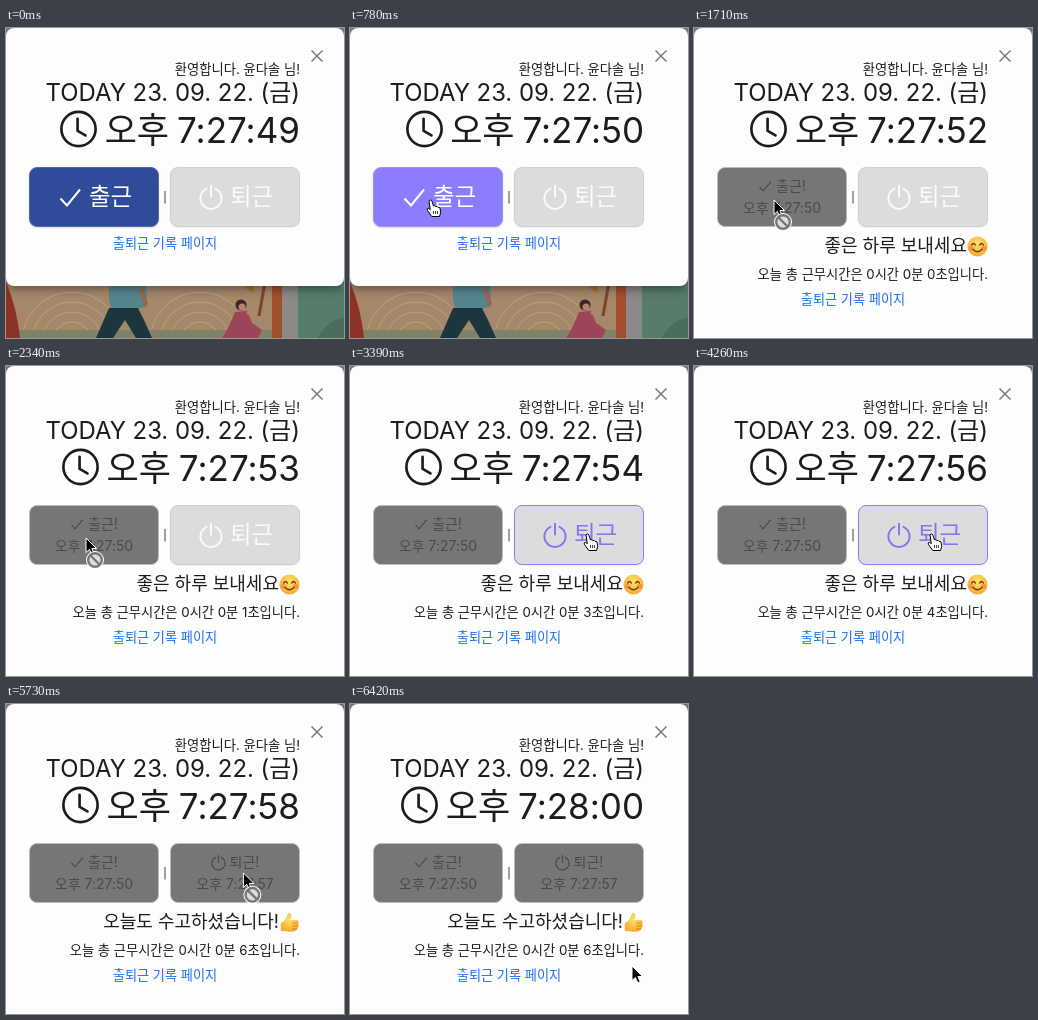
These frames come from a looping animation (338 px wide and 310 px high, 6450 ms). An HTML page:

```html
<!DOCTYPE html>
<html lang="ko">
<head>
<meta charset="utf-8">
<title>출퇴근</title>
<style>
html, body { margin: 0; width: 100%; height: 100%; overflow: hidden; }
body { font-family: Inter, "Noto Sans CJK KR", "Noto Sans CJK", sans-serif; color: #1c1c1e; }
#stage { position: relative; width: 338px; height: 310px; overflow: hidden; background: #808080; }
#stage svg { display: block; overflow: visible; }
#page, #modal, .abs { position: absolute; }
#page { left: 0; top: 254px; }
#modal { left: 0; top: 0; width: 338px; height: 258px; border-radius: 8px; background: #fdfdfd; box-shadow: 0 3px 10px #0006; }
.in #modal { height: 330px; }

/* zero line height: "top" is the middle of the capitals */
.t { position: absolute; line-height: 0; white-space: nowrap; }
.r { right: 44px; }
.mid { transform: translateX(-50%); }
#clock { display: flex; align-items: center; gap: 7.5px; right: 44px; top: 101px; transform: translateY(-50%);
  font-size: 35px; word-spacing: -2px; }
#link { left: 159px; top: 215px; font-size: 13.2px; color: #1a6ff0; }
.in #link { top: 271px; }
#msg { right: 65px; top: 218px; font-size: 18px; }
#work { top: 246px; font-size: 13.25px; }
.after { visibility: hidden; }
.in .after { visibility: visible; }

.btn { --h: 0; position: absolute; top: 139px; width: 130px; height: 60px; box-sizing: border-box;
  border: 1px solid; border-radius: 8px; line-height: 0; white-space: nowrap; }
#a { left: 23px; color: #fff; --bg: color-mix(in srgb, #8c7dff calc(var(--h) * 100%), #2f4b99);
  background: var(--bg); border-color: color-mix(in srgb, var(--bg) 75%, #cfcfcf); box-shadow: 0 1px 2px #0002; }
#b { left: 164px; background: #dcdcdc; box-shadow: 0 1px 2px #0001;
  color: color-mix(in srgb, #8577f0 calc(var(--h) * 100%), #fafafa);
  border-color: color-mix(in srgb, #8c7dff calc(var(--h) * 100%), #cfcfcf); }
.btn.focus { box-shadow: 0 0 0 4px #8c7dff1c; }
#stage .btn.done { background: #767676; border-color: #bcbcbc; color: #4b4b4b; box-shadow: none; }
.big { position: absolute; left: 28px; top: 29px; transform: translateY(-50%); display: flex; align-items: center; gap: 7px; font-size: 23.5px; }
.small { display: none; font-size: 14px; }
.small div { position: absolute; left: 0; right: 0; display: flex; justify-content: center; align-items: center; gap: 4px; height: 0; }
.done .big { display: none; }
.done .small { display: block; }
.out #smile, #thumb { display: none; }
.out #thumb { display: block; }
#cursor { left: 0; top: 0; }
</style>
</head>
<body>
<div id="stage">
  <svg id="page" width="338" height="56" viewBox="0 254 338 56">
    <rect y="254" width="276" height="56" fill="#a5876a"/>
    <g fill="none" stroke="#c0a07e">
      <g id="rings"><circle cx="66" cy="314" r="50"/><circle cx="66" cy="314" r="40"/><circle cx="66" cy="314" r="30"/><circle cx="66" cy="314" r="20"/></g>
      <use href="#rings" x="128"/>
    </g>
    <rect y="302" width="266" height="8" fill="#7f8267"/>
    <path d="M0 254Q11 280 14 310H0Z" fill="#8c3325"/>
    <path d="M103 254h37l1 24-10 3h-26l-2-10Z" fill="#53868c"/>
    <path d="M103 280h29l6 12 8 18h-16l-11-18-12 18H90Z" fill="#1d363e"/>
    <path d="M136 258l6 18-3 3-6-15Z" fill="#9a6650"/>
    <path d="M259 254l-6 34" stroke="#7b4728" stroke-width="3"/>
    <path d="M247 264q-8-2-9-9h11Z" fill="#a3752b"/>
    <circle cx="235" cy="277" r="5.5" fill="#3b2328"/>
    <circle cx="236" cy="279" r="3.5" fill="#b5836d"/>
    <path d="M229 284l12-1 5 12 10 7-4 8h-36q8-12 13-26Z" fill="#9c4458"/>
    <path d="M241 286l11-6" stroke="#b5836d" stroke-width="2.500"/>
    <rect x="266" y="254" width="10" height="56" fill="#a34f2b"/>
    <rect x="276" y="254" width="16" height="56" fill="#8a8988"/>
    <rect x="292" y="254" width="46" height="56" fill="#567d69"/>
    <path d="M312 310q8-18 26-20v20Z" fill="#4a6d5c"/>
  </svg>

  <div id="modal"></div>
  <svg class="abs" style="left:305px;top:22px" width="12" height="12" stroke="#7c7c7c" stroke-width="1.5"><path d="M.5.5l11 11M11.5.5l-11 11"/></svg>

  <div class="t r" style="top:41px;font-size:13.3px">환영합니다. 윤다솔 님!</div>
  <div class="t r" style="top:65px;font-size:23.9px">TODAY 23. 09. 22. (금)</div>
  <div class="t" id="clock">
    <svg width="37" height="37" viewBox="0 0 16 16" fill="none" stroke="currentColor" stroke-width="1.15" stroke-linecap="round"><circle cx="8" cy="8" r="7.4"/><path d="M7.6 3.6V8.8L11 10.8"/></svg>
    <span id="time"></span>
  </div>

  <div class="btn" id="a">
    <div class="big"><svg width="24" height="24" viewBox="0 0 24 24"><use href="#check"/></svg><span>출근</span></div>
    <div class="small">
      <div style="top:18px"><svg width="14" height="14" viewBox="0 0 24 24"><use href="#check"/></svg><span>출근!</span></div>
      <div style="top:40px">오후 7:27:50</div>
    </div>
  </div>
  <div class="t mid" style="left:159px;top:170px;font-size:10.500px">|</div>
  <div class="btn" id="b">
    <div class="big"><svg width="24" height="24" viewBox="0 0 24 24"><use href="#power"/></svg><span>퇴근</span></div>
    <div class="small">
      <div style="top:18px"><svg width="15" height="15" viewBox="0 0 24 24"><use href="#power"/></svg><span>퇴근!</span></div>
      <div style="top:40px">오후 7:27:57</div>
    </div>
  </div>

  <div class="t after" id="msg"></div>
  <svg class="abs after" style="left:273px;top:208px" width="21" height="21" viewBox="0 0 24 24" fill="none" stroke-linecap="round">
    <g id="smile">
      <circle cx="12" cy="12" r="11.5" fill="url(#face)"/>
      <circle cx="4.8" cy="14" r="3" fill="#f4793f" opacity=".6"/><circle cx="19.2" cy="14" r="3" fill="#f4793f" opacity=".6"/>
      <path d="M5.2 10.3q2.2-3.4 4.4 0M14.4 10.3q2.2-3.4 4.4 0M6.8 15.2q5.2 5.6 10.4 0" stroke="#6b3d12" stroke-width="1.6"/>
    </g>
    <g id="thumb">
      <path d="M2 12.5q4-1.5 6-5L10.5 1.5q3.5-1.5 3.5 3l-.8 4.5h7q2.8.5 1.8 3.2 1.5 1.5 0 3.3 1 2-.8 3.2.3 2.300-2 2.800-4 1.500-9 .8L2 21.5Z" fill="url(#face)"/>
      <path d="M15.5 12.6h5.500M15.5 16h5.500M15.5 19.2h4.500" stroke="#cf8517"/>
    </g>
  </svg>
  <div class="t r after" id="work"></div>
  <div class="t mid" id="link">출퇴근 기록 페이지</div>

  <svg class="abs" id="cursor" width="24" height="32">
    <g id="arrow">
      <path d="M0 0V14.5L3.4 11.4 5.7 16.8 8.2 15.7 5.9 10.5H10.5Z" fill="#000" stroke="#fff"/>
      <g id="ban"><circle cx="9" cy="22" r="9" fill="#fff"/><circle cx="9" cy="22" r="6.8" fill="#ddd" stroke="#777" stroke-width="2.4"/><path d="M4.5 17.5l9 9" stroke="#777" stroke-width="2.4"/></g>
    </g>
    <g id="hand" fill="#fff" stroke="#000" stroke-linejoin="round">
      <path d="M-1 1Q0-1 1.7.5L3.5 6q1.5-1 2.3.6 1.5-.8 2.2.8 2-.4 2.2 1.6l.5 3.5-1.2 4H1.8L-2.5 10.5q-1-2 .8-2.2l2 1.3Z"/>
      <path d="M3.5 11v3M5.6 11v3M7.6 11v3" stroke-width=".8"/>
    </g>
  </svg>

  <svg width="0" height="0">
    <defs>
      <radialGradient id="face" cy=".35" r=".7"><stop stop-color="#ffe26a"/><stop offset="1" stop-color="#f5a526"/></radialGradient>
      <path id="check" d="M2.5 13.5L9 20.5 22 4.5" fill="none" stroke="currentColor" stroke-width="2"/>
      <path id="power" d="M7.5 3.8A10.6 10.6 0 1 0 16.5 3.8M12 .8V11.5" fill="none" stroke="currentColor" stroke-width="2" stroke-linecap="round"/>
    </defs>
  </svg>
</div>
<script>
const LOOP = 6450, SECOND = 600;
const FIRST_TICK = 420, CLICK_IN = 1000, IN = 1380, CLICK_OUT = 5130, OUT = 5530;
// time, x, y of the pointer tip
const PATH = [
  [420, 40, 316], [660, 80, 172], [2400, 80, 172], [2850, 237, 168],
  [5700, 237, 168], [6270, 281, 269], [6420, 282, 262]
];
const $ = id => document.getElementById(id);
const clamp = v => Math.min(1, Math.max(0, v));
const ramp = (t, from) => clamp((t - from) / 90);
const show = (id, on) => { $(id).style.display = on ? '' : 'none'; };
const write = (id, text) => { if ($(id).textContent !== text) $(id).textContent = text; };

function pointer(t) {
  let i = 0;
  while (i < PATH.length - 2 && t >= PATH[i + 1][0]) i++;
  const [t0, x0, y0] = PATH[i], [t1, x1, y1] = PATH[i + 1];
  const u = clamp((t - t0) / (t1 - t0)), s = u * u * (3 - 2 * u);
  return [x0 + (x1 - x0) * s, y0 + (y1 - y0) * s];
}

function render(t) {
  const isIn = t >= IN, isOut = t >= OUT;
  $('stage').className = (isIn ? 'in ' : '') + (isOut ? 'out' : '');

  const sec = 50 + Math.floor((t - FIRST_TICK) / SECOND);
  write('time', `오후 7:${27 + Math.floor(sec / 60)}:${String(sec % 60).padStart(2, '0')}`);
  const worked = Math.min(6, Math.max(0, Math.floor((t - IN) / SECOND)));
  write('work', `오늘 총 근무시간은 0시간 0분 ${worked}초입니다.`);
  write('msg', isOut ? '오늘도 수고하셨습니다!' : '좋은 하루 보내세요');

  $('a').className = 'btn' + (isIn ? ' done' : t >= CLICK_IN ? ' focus' : '');
  $('b').className = 'btn' + (isOut ? ' done' : t >= CLICK_OUT ? ' focus' : '');
  $('a').style.setProperty('--h', ramp(t, 590));
  $('b').style.setProperty('--h', ramp(t, 2640));

  const [x, y] = pointer(t);
  const row = y > 139 && y < 199;
  const onA = row && x > 23 && x < 153, onB = row && x > 164 && x < 294;
  const hand = onA && !isIn || onB && !isOut;
  show('hand', hand);
  show('arrow', !hand);
  show('ban', onA || onB);
  $('cursor').style.transform = `translate(${x}px, ${y}px)`;
}

const start = performance.now();
function loop() {
  render((performance.now() - start) % LOOP);
  requestAnimationFrame(loop);
}
loop();
</script>
</body>
</html>
```
